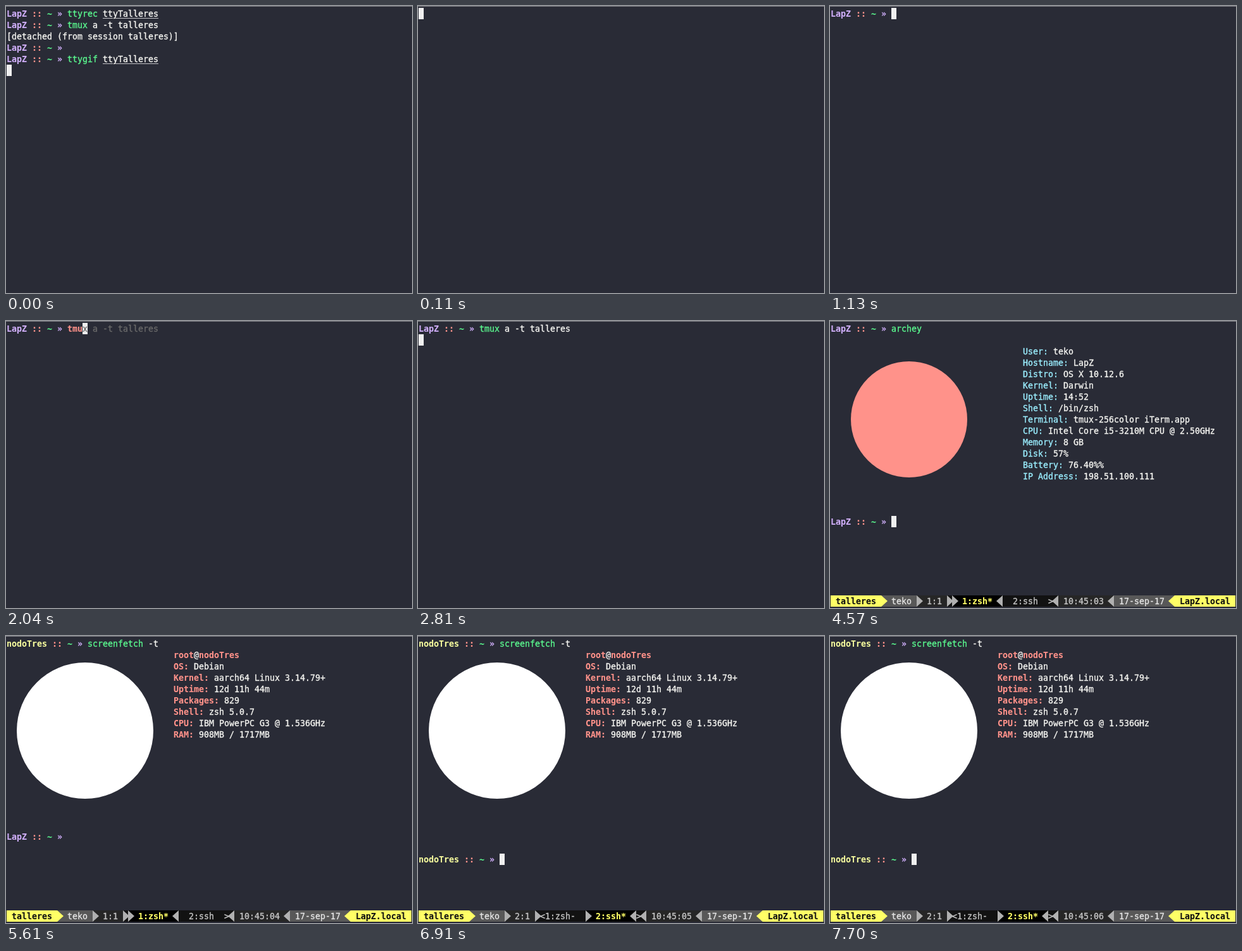
Recreate the animation shown at these times as an HTML page. Size 642 by 455 pixels, loop 8000 ms.

```html
<!DOCTYPE html>
<html lang="es">
<head>
<meta charset="utf-8">
<title>Terminal</title>
<style>
  html, body { margin: 0; width: 100%; height: 100%; overflow: hidden; background: #292b36; }
  #stage {
    position: relative; width: 642px; height: 455px; overflow: hidden;
    background: #292b36; color: #f4f4f0;
    font: 13.29px/18px "DejaVu Sans Mono", monospace;
    -webkit-text-stroke: .35px;
  }
  #stage::before { content: ""; position: absolute; width: 100%; height: 1px; background: #808186; }
  .scene { position: absolute; inset: 0; visibility: hidden; }
  .scene.on { visibility: visible; }
  .scene * { position: absolute; white-space: pre; }
  .scene span { padding-top: 1px; }
  .bold { font-weight: bold; -webkit-text-stroke: .1px; }
  .purple { color: #cfaef9; }
  .red { color: #ff928a; }
  .green { color: #5af78e; }
  .yellow { color: #f4f99d; }
  .cyan { color: #9aedfe; }
  .ghost { color: #686868; }
  .file { text-decoration: underline 1px #c4c4c8; text-underline-offset: 2px; }
  .black { color: #111; }
  .lemon { color: #ffff66; }
  .light { color: #e4e4e4; }
  .soft { color: #c4c4c4; }
  .box, .right, .left { height: 18px; }
  .right { clip-path: polygon(0 0, 100% 50%, 0 100%); }
  .left { clip-path: polygon(100% 0, 0 50%, 100% 100%); margin-left: -2px; }
  .disc { border-radius: 50%; }
</style>
</head>
<body>
<div id="stage"></div>
<script>
const LOOP = 8000, CELL = 8, LINE = 18, ARROW = 10;
const HOST = "LapZ", USER = "teko", REMOTE = "nodoTres", SESSION = "talleres", FILE = "ttyTalleres";

const at = (row, col) => `left:${1 + col * CELL}px;top:${3 + row * LINE}px`;
const text = (row, col, str, cls = "") => `<span class="${cls}" style="${at(row, col)}">${str.replace(/</g, "&lt;")}</span>`;
const shape = (kind, row, col, width, color) =>
  `<i class="${kind}" style="${at(row, col)};width:${width}px;background:${color}"></i>`;
const cursor = (row, col) => shape("box", row, col, CELL, "#f0f0f0");
const disc = (x, y, r, color) =>
  `<i class="disc" style="left:${x - r}px;top:${y - r}px;width:${2 * r}px;height:${2 * r}px;background:${color}"></i>`;

function prompt(row, name = HOST, color = "purple") {
  const col = name.length + 1;
  return text(row, 0, name, "bold " + color) + text(row, col, "::", "bold red") +
    text(row, col + 3, "~", "bold green") + text(row, col + 5, "»", "bold purple");
}
const record = (row, tool) => prompt(row) + text(row, 12, tool, "green") + text(row, 19, FILE, "file");
const attach = row => prompt(row) + text(row, 12, "tmux", "green") + text(row, 17, "a -t " + SESSION);

// Partly typed command followed by the shell's grey suggestion
function typing(line, count) {
  const col = 12 + count;
  return prompt(0) + text(0, 12, line.slice(0, count), "bold red") + cursor(0, col) +
    text(0, col, line.slice(count), "ghost");
}

function facts(row, col, list, cls) {
  return list.map(([label, value], i) =>
    text(row + i, col, label + ":", cls) + text(row + i, col + label.length + 2, value)).join("");
}

function statusBar(active, clock) {
  const row = 24, yellow = "#ffff66", grey = "#585858", dark = "#262626", ink = "#121212", tip = "#b0b0b0";
  const box = (col, cells, color) => shape("box", row, col, cells * CELL, color);
  const right = (col, color = tip) => shape("right", row, col, ARROW, color);
  const left = (col, color = tip) => shape("left", row, col, ARROW, color);
  const start = active === 1 ? 24 : 33;
  const tabs = active === 1
    ? text(row, 26, "1:zsh*", "bold lemon") + text(row, 36, "2:ssh", "soft")
    : text(row, 24, "<1:zsh-", "soft") + text(row, 35, "2:ssh*", "bold lemon");
  return box(0, 10, yellow) + box(10, 7, grey) + box(17, 6, dark) + box(23, 21, ink) +
    box(44, 12, dark) + box(55, 12, grey) + box(67, 13, yellow) +
    box(start, 10, "#000") + right(start) + left(start + 9) +
    right(10, yellow) + right(17) + right(23) +
    box(44, 1, ink) + left(44) + box(55, 1, dark) + left(55) + box(67, 1, grey) + left(67, yellow) +
    text(row, 1, SESSION, "bold black") + text(row, 12, USER, "light") +
    text(row, 19, active + ":1", "soft") + tabs + text(row, 43, ">", "soft") +
    text(row, 46, "10:45:0" + clock, "soft") + text(row, 57, "17-sep-17", "light") +
    text(row, 69, HOST + ".local", "bold black");
}

const desktop = clock => prompt(0) + text(0, 12, "archey", "green") +
  disc(125, 156, 92, "#ff928a") +
  facts(2, 38, [
    ["User", USER], ["Hostname", HOST], ["Distro", "OS X 10.12.6"], ["Kernel", "Darwin"],
    ["Uptime", "14:52"], ["Shell", "/bin/zsh"], ["Terminal", "tmux-256color iTerm.app"],
    ["CPU", "Intel Core i5-3210M CPU @ 2.50GHz"], ["Memory", "8 GB"], ["Disk", "57%"],
    ["Battery", "76.40%%"], ["IP Address", "198.51.100.111"]
  ], "cyan") +
  prompt(17) + cursor(17, 12) + statusBar(1, clock);

const server = () => prompt(0, REMOTE, "yellow") +
  text(0, 16, "screenfetch", "green") + text(0, 28, "-t") +
  disc(125, 150, 108, "#fff") +
  text(1, 33, "root", "bold red") + text(1, 37, "@") + text(1, 38, REMOTE, "bold red") +
  facts(2, 33, [
    ["OS", "Debian"], ["Kernel", "aarch64 Linux 3.14.79+"], ["Uptime", "12d 11h 44m"],
    ["Packages", "829"], ["Shell", "zsh 5.0.7"], ["CPU", "IBM PowerPC G3 @ 1.536GHz"],
    ["RAM", "908MB / 1717MB"]
  ], "bold red");
const serverReady = clock => server() + prompt(19, REMOTE, "yellow") + cursor(19, 16) + statusBar(2, clock);

const tmuxLine = "tmux a -t " + SESSION;
const scenes = [
  [0, record(0, "ttyrec") + attach(1) + text(2, 0, `[detached (from session ${SESSION})]`) +
      prompt(3) + record(4, "ttygif") + cursor(5, 0)],
  [110, cursor(0, 0)],
  [170, prompt(0) + cursor(0, 12)],
  [1280, typing("ttygif " + FILE, 1)],
  [1500, typing(tmuxLine, 2)],
  [2040, typing(tmuxLine, 3)],
  [2710, attach(0) + cursor(0, 30)],
  [2810, attach(0) + cursor(1, 0)],
  [2910, desktop(2)],
  [4570, desktop(3)],
  [5610, server() + prompt(17) + statusBar(1, 4)],
  [6910, serverReady(5)],
  [7700, serverReady(6)]
];

const stage = document.getElementById("stage");
stage.innerHTML = scenes.map(([, html]) => `<div class="scene">${html}</div>`).join("");
const layers = [...stage.children];
const began = performance.now();
let shown = -1;

function tick() {
  const time = (performance.now() - began) % LOOP;
  const now = scenes.filter(([start]) => start <= time).length - 1;
  if (now !== shown) {
    layers.forEach((layer, i) => layer.classList.toggle("on", i === now));
    shown = now;
  }
  requestAnimationFrame(tick);
}
tick();
</script>
</body>
</html>
```
